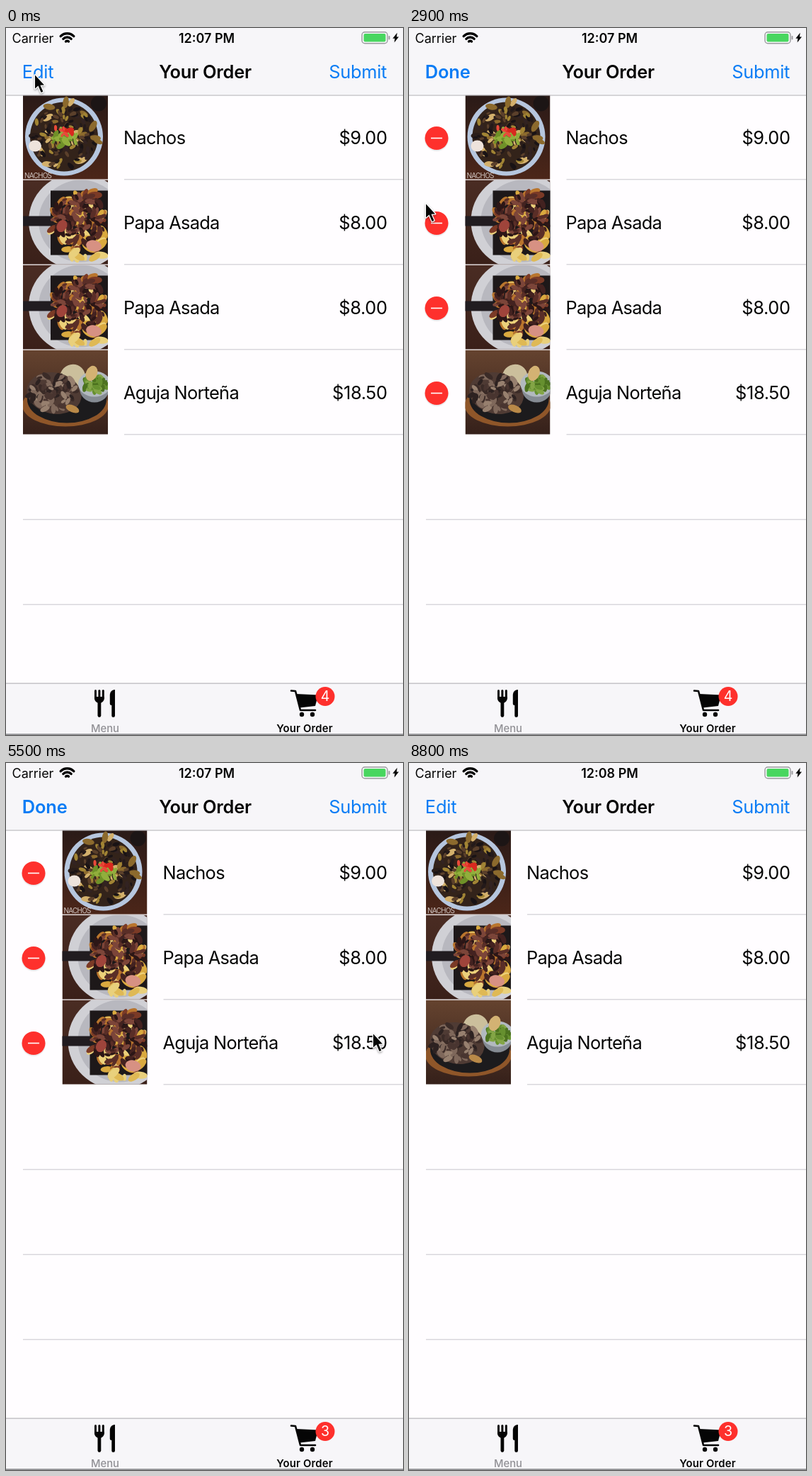
Animation of 561x998 px, one loop 8.9 s. Source, as an HTML page with a canvas:

```html
<!DOCTYPE html>
<html lang="en">
<head>
<meta charset="utf-8">
<title>Your Order</title>
<style>
  html, body { margin: 0; width: 100%; height: 100%; overflow: hidden; background: #fffdff; }
  canvas { display: block; width: 561px; height: 998px; }
</style>
</head>
<body>
<canvas id="stage"></canvas>
<script>
const W = 561, H = 998, LOOP = 8900, STEP = 100;
const ROW = 120, TOP = 94.5, MARGIN = 24, RIGHT = 538, ROWS = 6;
const INDENT = 55.5, SWIPE = 110.5;
const INK = '#050505', BLUE = '#0a7cf5', RED = '#fe302c', BAR = '#f7f6f9', PAPER = '#fffdff';
const RULE = '#d0cfd4', EDGE = '#b7b6ba', GREY = '#929196';

// Moments of the story, in ms
const EDIT = 1400, REVEAL = 4100, REMOVED = 5500, LOADED = 5600, DONE = 7440, MINUTE = 8600;
const ANIM = 350, PRESS = 150;

const canvas = document.getElementById('stage');
const dpr = window.devicePixelRatio || 1;
canvas.width = W * dpr;
canvas.height = H * dpr;
const c = canvas.getContext('2d');

const span = (t, start, length) => Math.max(0, Math.min(1, (t - start) / length));
const ease = p => p < 0.5 ? 2 * p * p : 1 - 2 * (1 - p) * (1 - p);
const mix = (a, b, p) => a + (b - a) * p;

function rect(x, y, w, h, color) {
  c.fillStyle = color;
  c.fillRect(x, y, w, h);
}

function round(x, y, w, h, r, color) {
  c.fillStyle = color;
  c.beginPath();
  c.roundRect(x, y, w, h, r);
  c.fill();
}

function oval(x, y, rx, ry, color, turn = 0) {
  c.fillStyle = color;
  c.beginPath();
  c.ellipse(x, y, rx, ry, turn, 0, Math.PI * 2);
  c.fill();
}

function trace(...pts) {
  c.beginPath();
  for (let i = 0; i < pts.length; i += 2) c.lineTo(pts[i], pts[i + 1]);
}

function text(str, x, y, { size = 25.4, weight = 400, color = INK, align = 'left', gap = 0 } = {}) {
  c.font = `${weight} ${size}px Inter, Roboto, sans-serif`;
  c.letterSpacing = gap + 'px';
  c.textAlign = align;
  c.fillStyle = color;
  c.fillText(str, x, y);
}

function faded(alpha, draw) {
  c.save();
  c.globalAlpha = alpha;
  draw();
  c.restore();
}

// Evenly spread bits of food inside an ellipse
function bits(n, x, y, rx, ry, size, colors) {
  let seed = 97 * n + 7;
  const rnd = () => (seed = (seed * 16807) % 2147483647) / 2147483647;
  for (let i = 0; i < n; i++) {
    const a = rnd() * Math.PI * 2, d = Math.sqrt(rnd());
    const s = size * mix(0.6, 1.3, rnd());
    oval(x + Math.cos(a) * d * rx, y + Math.sin(a) * d * ry, s, s / 2, colors[i % colors.length], a * 3);
  }
}

function wood(top, bottom) {
  const g = c.createLinearGradient(0, 0, 0, ROW);
  g.addColorStop(0, top);
  g.addColorStop(1, bottom);
  rect(0, 0, ROW, ROW, g);
}

const photos = {
  nachos() {
    wood('#2a1a17', '#4c2619');
    oval(58, 59, 55, 55, '#b6c6de');
    oval(58, 59, 48, 49, '#33231a');
    bits(40, 58, 59, 50, 50, 7, ['#d3b06c', '#2a1d19', '#8c6a2d']);
    bits(110, 58, 59, 44, 44, 4.5, ['#191315', '#5b402b', '#241a1a', '#a18434', '#322322']);
    oval(17, 72, 9, 8, '#eee3dc');
    bits(24, 59, 62, 18, 12, 6, ['#6f9128', '#91ae3c']);
    bits(12, 58, 50, 14, 7, 5, ['#d9291f', '#e9493a']);
    oval(107, 12, 11, 11, '#1c1515');
    text('NACHOS', 2, 117, { size: 10, color: '#cfc4c0', gap: -0.8 });
  },
  papa() {
    wood('#4a2c23', '#3a2019');
    oval(78, 58, 70, 68, '#d0d0d5');
    oval(82, 58, 60, 58, '#b8b8bf');
    rect(39, 15, ROW, 91, '#1d1819');
    round(-8, 51, 54, 14, 6, '#211c20');
    bits(80, 82, 60, 42, 46, 9, ['#d9a93f', '#7b3a26', '#ecd07a', '#b9752d']);
    bits(110, 80, 55, 37, 36, 6, ['#5a2e27', '#2c1616', '#7c4539', '#432220']);
    oval(55, 65, 7, 9, '#9f443b', 0.5);
    oval(100, 93, 11, 8, '#d79183', 0.2);
    bits(9, 88, 106, 26, 5, 8, ['#e9d07c', '#dfb955']);
  },
  aguja() {
    wood('#65432f', '#35201a');
    oval(60, 78, 61, 30, '#8f5629');
    oval(62, 70, 56, 33, '#1c1b1d');
    oval(70, 39, 18, 19, '#cbbf9c', 0.4);
    oval(44, 61, 39, 29, '#4f3b34', 0.2);
    bits(90, 43, 60, 35, 26, 6, ['#3b2b27', '#7f685b', '#493530', '#97806f', '#2d2221']);
    oval(70, 83, 10, 5, '#b98948', 0.4);
    oval(101, 54, 21, 20, '#858b93');
    oval(101, 48, 23, 18, '#b2b9bf');
    bits(50, 101, 48, 15, 11, 6, ['#66902f', '#4c721f', '#83a546']);
    oval(97, 33, 8, 11, '#d3b273', 0.4);
  }
};

const order = [
  { name: 'Nachos', price: '$9.00', photo: 'nachos' },
  { name: 'Papa Asada', price: '$8.00', photo: 'papa' },
  { name: 'Papa Asada', price: '$8.00', photo: 'papa' },
  { name: 'Aguja Norteña', price: '$18.50', photo: 'aguja' }
];
const VICTIM = 2;

function photo(kind, x, y) {
  c.save();
  c.beginPath();
  c.rect(x, y, ROW, ROW - 1);
  c.clip();
  c.translate(x, y);
  photos[kind]();
  c.restore();
}

function minus(x, y) {
  oval(x, y + 1.5, 17, 17, 'rgba(0,0,0,.08)');
  oval(x, y, 16.5, 16.5, RED);
  rect(x - 8, y - 0.8, 16, 1.6, '#fff');
}

const rule = (x, i) => rect(x, TOP + i * ROW + 118.7, W, 1.2, RULE);

function row({ name, price, photo: kind }, i, indent, alpha, swipe) {
  const y = TOP + i * ROW, dx = indent - swipe, base = y + 69;
  rule(167 + dx, i);
  if (swipe > 0) {
    const x = W + 2 - swipe;
    rect(x, y, W, ROW - 1, RED);
    text('Delete', x + 21.5, y + 68, { size: 22.4, color: '#fff', gap: -0.4 });
  }
  faded(alpha, () => minus(dx - 16.5, y + 61));
  photo(kind, MARGIN + dx, y);
  text(name, 166 + dx, base, { gap: -0.7 });
  text(price, RIGHT - swipe + 0.5, base, { align: 'right', gap: -0.4 });
}

function table(t) {
  const opening = span(t, EDIT, ANIM), closing = span(t, DONE, ANIM);
  const indent = INDENT * (ease(opening) - ease(closing));
  const swipe = SWIPE * ease(span(t, REVEAL, ANIM));
  const removed = t >= REMOVED;
  const items = removed ? order.filter((_, i) => i !== VICTIM) : order;
  items.forEach((item, i) => {
    const target = i === VICTIM;
    // The reused cell keeps its old picture until the new one has loaded
    const shown = target && removed && t < LOADED ? { ...item, photo: order[VICTIM].photo } : item;
    row(shown, i, indent, opening - closing, target && !removed ? swipe : 0);
  });
  for (let i = items.length; i < ROWS; i++) rule(MARGIN, i);
}

function statusBar(t) {
  text('Carrier', 8.5, 20.5, { size: 18 });
  text(t < MINUTE ? '12:07 PM' : '12:08 PM', 283.5, 20.5, { size: 18, weight: 600, align: 'center' });

  c.strokeStyle = INK;
  c.lineWidth = 3.4;
  for (let i = 0; i < 3; i++) {
    c.beginPath();
    c.arc(86.5, 21, 2.8 + i * 5.2, -Math.PI * 0.75, -Math.PI * 0.25);
    c.stroke();
  }

  c.strokeStyle = '#9b9a9e';
  c.lineWidth = 1.4;
  c.beginPath();
  c.roundRect(503, 5.7, 36, 16, 4);
  c.stroke();
  round(505.5, 8, 31, 11.5, 2, '#48d65f');
  round(540.5, 11, 2, 5.5, 1, '#9b9a9e');

  c.fillStyle = INK;
  for (const s of [1, -1]) {
    trace(550.7 + s * 2, 13.6 - s * 6.8, 550.7 - s * 4.3, 13.6 + s * 1.2, 550.7 + s, 13.6 + s * 1.2);
    c.fill();
  }
}

function navBar(t) {
  rect(0, 0, W, TOP, BAR);
  rect(0, TOP, W, 1.1, EDGE);
  statusBar(t);
  const base = 70.5, editing = t >= EDIT && t < DONE;
  text('Your Order', 281.5, base, { weight: 600, align: 'center', gap: -0.25 });
  text('Submit', RIGHT, base, { color: BLUE, align: 'right', gap: -0.3 });

  // Dimmed while pressed, then the new label fades in
  const swap = t < DONE - PRESS ? EDIT : DONE;
  const alpha = t < swap - PRESS || t >= swap + ANIM ? 1 : mix(0.45, 1, span(t, swap, ANIM));
  faded(alpha, () => text(editing ? 'Done' : 'Edit', 22.8, base,
    { color: BLUE, weight: editing ? 600 : 400, gap: -0.15 }));
}

function cutlery() {
  for (let i = 0; i < 3; i++) round(125 + i * 5.4, 934, 3, 14, 1.5, INK);
  round(125, 944, 13.8, 9, [0, 0, 7, 7], INK);
  round(129.5, 948, 4.8, 25, 2.4, INK);
  round(146.8, 934, 7.2, 22, [7, 0, 0, 2], INK);
  round(149.3, 948, 4.7, 25, 2.4, INK);
}

function cart() {
  c.strokeStyle = c.fillStyle = INK;
  c.lineWidth = 2.6;
  c.lineCap = c.lineJoin = 'round';
  trace(403, 935.5, 409, 936, 416, 963, 437, 963);
  c.stroke();
  trace(410, 940, 441, 941.5, 437, 957, 415, 959.5);
  c.fill();
  for (const x of [418, 433]) oval(x, 969, 3.2, 3.2, INK);
}

function tabBar(t) {
  rect(0, 925, W, 73, BAR);
  rect(0, 924.5, W, 1.2, EDGE);
  rect(0, 996.4, W, 1.3, '#707072');
  cutlery();
  cart();
  oval(451, 943.5, 13.5, 13.5, RED);
  text(t < REMOVED ? '4' : '3', 451, 950.3, { size: 19.5, color: '#fff', align: 'center' });
  text('Menu', 140, 993.5, { size: 14.8, weight: 500, color: GREY, align: 'center' });
  text('Your Order', 422, 993.5, { size: 14.8, weight: 600, align: 'center', gap: 0.2 });
}

// Each glide: start, end and where the pointer comes to rest
const START = { x: 40, y: 65 };
const glides = [
  { from: 900, to: 1200, x: 46, y: 57 },
  { from: 1700, to: 2900, x: 23, y: 247 },
  { from: 3000, to: 3900, x: 42, y: 396 },
  { from: 4600, to: 5200, x: 518, y: 381 },
  { from: 5700, to: 7000, x: 44, y: 61 }
];

function pointer(t) {
  if (t >= MINUTE) return;
  let { x, y } = START;
  for (const g of glides) {
    const p = ease(span(t, g.from, g.to - g.from));
    x = mix(x, g.x, p);
    y = mix(y, g.y, p);
  }
  c.save();
  c.translate(x + 1, y + 1.5);
  c.lineWidth = 2.6;
  c.strokeStyle = '#fff';
  c.fillStyle = INK;
  c.shadowColor = 'rgba(0,0,0,.35)';
  c.shadowBlur = 3;
  c.shadowOffsetY = 1.5;
  trace(0, 0, 0, 19, 4.5, 15, 8.6, 24.4, 11.4, 23.2, 7.4, 14.2, 13, 14);
  c.closePath();
  c.stroke();
  c.shadowColor = 'transparent';
  c.fill();
  c.restore();
}

function draw(t) {
  c.setTransform(dpr, 0, 0, dpr, 0, 0);
  rect(0, 0, W, H, PAPER);
  table(t);
  navBar(t);
  tabBar(t);
  pointer(t);
}

function tick() {
  draw(Math.floor((performance.now() % LOOP) / STEP) * STEP);
  requestAnimationFrame(tick);
}
tick();
</script>
</body>
</html>
```
